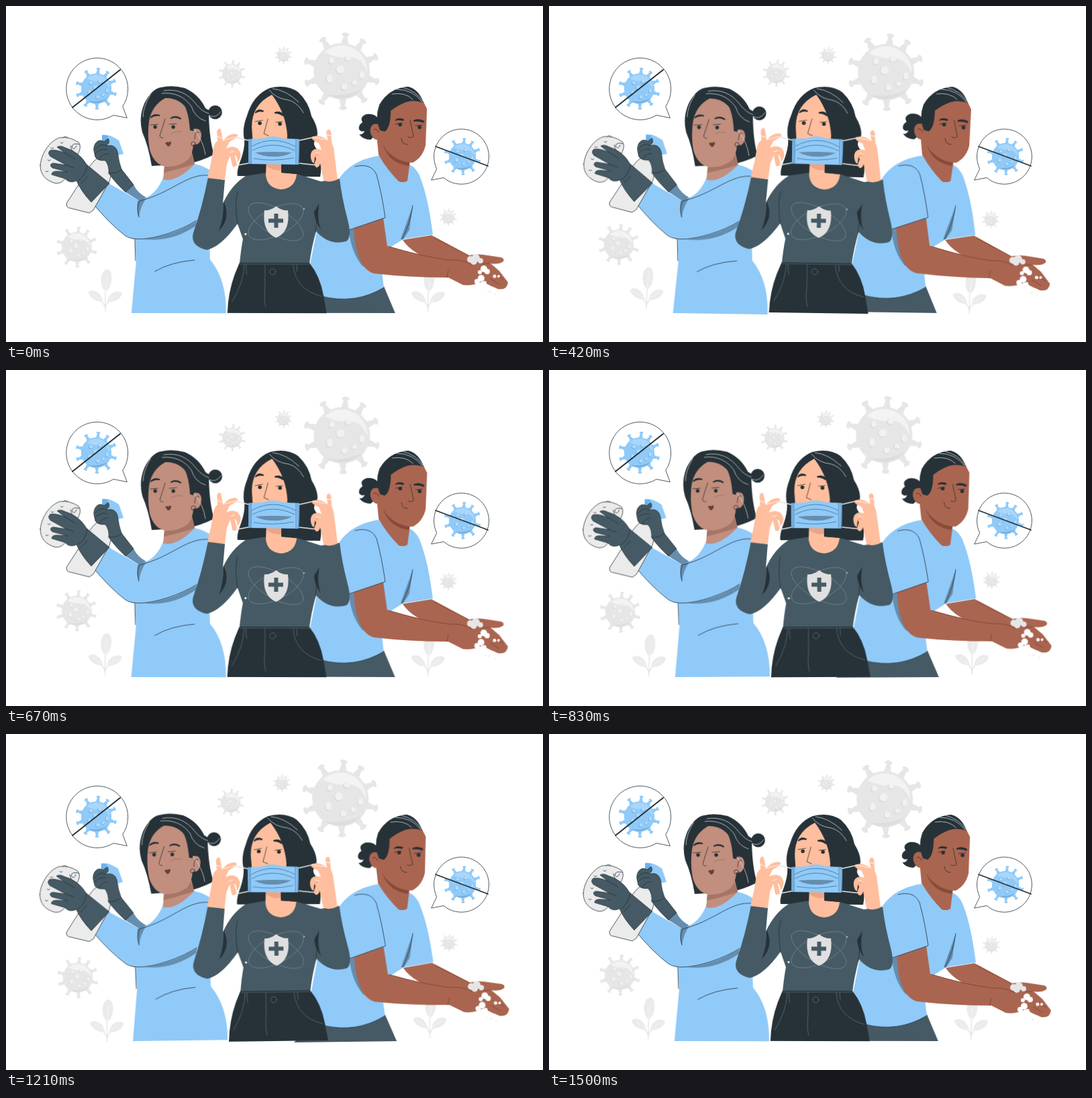
An HTML page for the animation above (1.54 s loop, 800 px wide and 500 px high).

```html
<!DOCTYPE html>
<html lang="en">
<head>
<meta charset="utf-8">
<title>Protection</title>
<style>
html, body { margin: 0; height: 100%; overflow: hidden; background: #fff; }
svg { display: block; width: 100vw; height: 100vh; }
.sway { animation: sway 1540ms linear infinite; }
@keyframes sway {
  0%, 97.4%, 100% { transform: rotate(.067deg); }
  22.7% { transform: rotate(1deg); }
  71.4% { transform: rotate(-1deg); }
}
.blue { fill: #90caf9; }
.shade { fill: #658dae; }
.slate { fill: #455a64; }
.dark { fill: #263238; }
.pale { fill: #ebebeb; }
.tan { fill: #c28e7d; }
.peach { fill: #ffbe9d; }
.brown { fill: #aa6550; }
.line, .edge { stroke: #263238; stroke-width: .8; stroke-linecap: round; stroke-linejoin: round; }
.line { fill: none; }
.thick { stroke-width: 1.2; }
.light { stroke: #dfe5e8; stroke-width: .7; }
.seam { stroke: #64747c; stroke-width: .7; }
.gray { --body: #e6e6e6; --glow: #f3f3f3; --bump: #f1f1f1; --dent: #dadada; }
.azure { --body: #90caf9; --glow: #a9d6fb; --bump: #b4dcfc; --dent: #6ea6d6; }
</style>
</head>
<body>
<svg viewBox="0 0 800 500">
<defs>
  <path id="spike" d="M-6-39 L-2.8-52 Q-6-53-5.5-56 Q0-60 5.5-56 Q6-53 2.8-52 L6-39Z"/>
  <g id="virus">
    <g fill="var(--body)">
      <use href="#spike" transform="rotate(6)"/>
      <use href="#spike" transform="rotate(35)"/>
      <use href="#spike" transform="rotate(67)"/>
      <use href="#spike" transform="rotate(106)"/>
      <use href="#spike" transform="rotate(142)"/>
      <use href="#spike" transform="rotate(178)"/>
      <use href="#spike" transform="rotate(213)"/>
      <use href="#spike" transform="rotate(251)"/>
      <use href="#spike" transform="rotate(286)"/>
      <use href="#spike" transform="rotate(329)"/>
      <circle r="42"/>
    </g>
    <path fill="var(--glow)" d="M-26-28 A38 38 0 0 1 38 2 Q32-18 14-21 Q-4-18-26-28Z"/>
    <path fill="var(--dent)" d="M-23 34 Q4 39 31 26 A42 42 0 0 1-23 34Z" opacity=".7"/>
    <g fill="var(--dent)">
      <circle cx="-3" cy="-2" r="6.5"/><ellipse cx="-19" cy="12" rx="5" ry="6.5"/>
      <circle cx="-16" cy="-15" r="5"/><circle cx="9" cy="-19" r="5"/>
      <circle cx="3" cy="24" r="5"/><ellipse cx="29" cy="6" rx="4.5" ry="6"/><circle cx="18" cy="18" r="4"/>
    </g>
    <g fill="var(--bump)">
      <circle cx="-2" cy="-3" r="6"/><ellipse cx="-18" cy="11" rx="4.5" ry="6"/>
      <circle cx="-15" cy="-16" r="4.4"/><circle cx="10" cy="-20" r="4.4"/>
      <circle cx="4" cy="23" r="4.4"/><ellipse cx="30" cy="5" rx="4" ry="5.5"/><circle cx="19" cy="17" r="3.5"/>
    </g>
  </g>
  <g id="plant">
    <path d="M148 455 Q148 430 149.500 400 M148 450 Q146 438 126 428 M148 450 Q150 438 170 430" fill="none" stroke="#e6e6e6" stroke-width="1.4"/>
    <path class="pale" d="M149 425 C138 418 140 393 151 392 C161 394 159 420 149 425Z M145 440 C136 442 124 434 123 426 C132 420 143 428 145 440Z M151 440 C153 428 164 422 173 427 C173 436 160 443 151 440Z"/>
    <path d="M149 424 L150.500 402 M144 439 L130 429 M152 439 L166 430" fill="none" stroke="#f8f8f8" stroke-width=".8"/>
  </g>
</defs>

<g class="sway gray" style="transform-origin:400px 248px">
  <use href="#virus" transform="translate(500 97)"/>
  <use href="#virus" transform="translate(336.500 101) scale(.35)"/>
  <use href="#virus" transform="translate(413 73) scale(.225)"/>
  <use href="#virus" transform="translate(105.500 359) scale(.53)"/>
  <use href="#virus" transform="translate(659 314) scale(.225)"/>
  <use href="#plant"/>
  <use href="#plant" x="481"/>
</g>

<g class="azure">
  <path class="edge" fill="#fff" d="M174 149 A46 46 0 1 0 160 162.500 L180 166.500Z"/>
  <use href="#virus" transform="translate(134.500 123) scale(.54)"/>
  <path class="line" d="M99 151 L170 95" style="stroke-width:2"/>
  <path class="edge" fill="#fff" d="M641.500 242 A41 41 0 1 1 652 255.500 L634 259Z"/>
  <use href="#virus" transform="translate(680 224) scale(.48)"/>
  <path class="line" d="M640 209 L718 238" style="stroke-width:1.800"/>
</g>

<!-- man washing hands -->
<g class="sway" style="transform-origin:588px 288px">
  <path class="slate" d="M427 457 L460 425 L563 417 L580 457Z"/>
  <path class="blue" d="M555 223 C530 227 510 237 497 256 L470 300 L450 400 L470 432 Q520 445 563 419 L559 385 L571 360 L592 347 L636 340 C632 310 627 280 616 252 Q610 240 601 236 L590 263Z"/>
  <path class="shade" d="M606 297 L588 347 L592 347 L601 333Z M511 333 Q514 368 532 388 L548 360 L530 329Z"/>
  <path class="line" d="M606 297 Q602 325 590 347 M470 432 Q520 445 563 419"/>
  <!-- far arm and hand -->
  <path class="brown" d="M591 348 L634 341 L690 371 Q704 368 718 371 L738 374 Q743 376 741 380 Q734 385 722 383 L735 394 L748 411 Q747 423 733 421 L690 400 L648 383 Q605 370 591 348Z"/>
  <!-- near arm -->
  <path class="brown" d="M518 330 L562 315 L568 357 Q620 372 658 378 Q680 376 694 384 L722 388 Q732 395 741 407 Q744 416 741 420 Q725 421 711 409 Q697 417 681 415 L659 404 Q600 404 548 398 Q521 390 518 330Z"/>
  <path class="line" d="M571 358 Q620 373 660 378 Q682 377 694 385 M659 393 L657 404 M720 383 Q708 384 700 381 M741 407 L731 400 M735 414 L722 406 M638 345 L689 371" style="stroke:#7b3f30"/>
  <path class="blue" d="M497 256 Q519 229 548 238 C557 262 562 290 565 315 L512 333Z"/>
  <path class="line" d="M520 239 Q544 233 552 251 Q560 280 565 315 L512 333"/>
  <!-- foam -->
  <g fill="#e6e6e6"><circle cx="692" cy="377" r="5"/><circle cx="700" cy="375" r="6"/><circle cx="697" cy="380" r="5"/><circle cx="707" cy="379" r="4"/></g>
  <g fill="#fff"><circle cx="712" cy="391" r="5"/><circle cx="706" cy="396" r="3"/><circle cx="717" cy="395" r="4"/><circle cx="708" cy="405" r="5"/><circle cx="702" cy="410" r="4"/><circle cx="713" cy="412" r="3"/><circle cx="728" cy="402" r="2.500"/><circle cx="734" cy="402" r="2"/></g>
  <g fill="#f0f0f0"><circle cx="721" cy="425" r="1.800"/><circle cx="729" cy="429" r="1.200"/><circle cx="715" cy="424" r="1"/></g>
  <!-- head -->
  <path class="dark" d="M556 169 Q549 159 537 161 Q526 165 531 173 Q524 178 526 184 Q529 188 534 186 Q532 192 526 191 Q532 199 543 199 Q552 192 556 182Z"/>
  <path class="brown" d="M552 192 L555 222 Q568 244 585 261 Q592 264 598 260 L602 230 L590 200Z"/>
  <path d="M562 208 Q571 234 600 238 L602 230Z" fill="#884b3a"/>
  <path class="brown" d="M557 177 C546 172 541 180 543 189 Q546 201 558 199 L566 214 Q583 233 606 233 Q621 225 625 207 L627 153 L620 139 L585 137 L566 160Z"/>
  <path class="dark" d="M557 185 Q549 166 556 147 Q570 122 599 120 Q615 124 622 144 Q608 139 596 143 Q583 148 573 156 Q573 181 564 187Z"/>
  <path class="line light" d="M582 124 Q606 124 620 143 M590 121 Q611 126 621 142 M575 131 Q595 128 606 139"/>
  <path class="line" d="M602 170 Q604 181 607 194 Q604 197 599 195 M580 176 L590 174 M610 178 L620 177 M548 184 Q552 181 555 188 M589 197 Q589 206 598 206"/>
  <path class="dark" d="M579 171 Q582 165 592 168 Q594 170 591 171 Q585 169 579 171Z M607 170 Q614 166 623 171 L622 174 Q615 171 607 172Z"/>
  <circle class="dark" cx="587" cy="176.500" r="2.800"/><circle class="dark" cx="616" cy="180.500" r="2.800"/>
</g>

<!-- woman with spray -->
<g class="sway" style="transform-origin:190px 288px">
  <path class="dark" d="M217 238 Q212 208 203 188 Q197 166 206 145 Q217 123 231 121 Q247 117 266 122 Q287 131 297 152 L302 155 L302 163 Q303 200 310 221 Q290 231 270 235Z"/>
  <circle class="dark" cx="311.500" cy="158" r="10.300"/>
  <!-- shirt -->
  <path class="blue" d="M236 250 L233 258 Q224 278 209 285 L199 290 L153 264 L127 291 Q154 324 178 342 L192 348 L194 381 L187 457 L328 457 Q329 407 304 377 L303 345 L320 300 L306 246 Q296 238 281 235Z"/>
  <path class="shade" d="M205 347 Q246 343 284 320 L283 327 Q246 352 205 347Z M196 290 L209 286 Q200 298 198 315 Q194 305 196 290Z M162 252 L172 243 L190 266 Q196 278 209 285 L199 290 L178 277Z"/>
  <path class="line" d="M303 252 C270 248 246 279 199 290 Q194 301 198 314 M127 291 Q154 324 178 342 Q195 353 240 339 Q267 330 284 319 M222 395 Q245 381 281 378 M192 348 L193 379"/>
  <!-- neck and face -->
  <path class="tan" d="M237 229 L234 258 Q254 263 281 235 L276 214Z"/>
  <path d="M236 238 Q261 240 276 220 L281 235 Q266 240 235 248Z" fill="#a67565"/>
  <path class="tan" d="M237 137 Q217 148 213 171 Q210 193 214 214 Q220 235 237 239 Q257 240 271 229 Q278 220 279 206 Q290 208 291 192 Q290 179 277 184 L271 155 Q258 136 237 137Z"/>
  <path class="dark" d="M237 137 Q252 131 264 145 Q272 157 274 185 L279 186 Q286 165 273 146 Q255 128 237 137Z"/>
  <path class="line light" d="M235 126 Q264 121 283 146 Q292 157 302 160 M232 130 Q260 127 276 149 Q281 166 297 171 M215 132 Q204 150 204 165 M280 183 Q294 201 297 221 M303 163 Q312 168 320 157"/>
  <path class="line" d="M237 168 Q233 180 229 193 Q230 197 234 196 M215 177 L226 176 M243 176 L254 175 M281 198 Q281 185 287 188"/>
  <path class="line" d="M246 190 L253 187 L262 187" style="stroke:#94675a;stroke-width:.6"/>
  <path class="dark" d="M215 165 Q220 159 229 162 L229 164 Q222 162 215 167Z M245 166 Q253 161 261 167 L260 169 Q253 164 245 168Z"/>
  <circle class="dark" cx="222" cy="180" r="2.700"/><circle class="dark" cx="249" cy="180" r="2.700"/>
  <path d="M237 204 Q240 201 242 203 Q245 200 246 203 Q245 209 241 209Z" fill="#683f37"/>
  <circle class="line" cx="279" cy="205" r="3.200"/>
  <!-- spray bottle -->
  <path class="pale edge" d="M148 218 Q126 231 119 249 L90 294 Q90 301 96 301 L124 308 L130 304 L154 261 L161 235Z"/>
  <path class="blue" d="M143 192 Q154 190 168 200 L175 220 L164 223 L154 207 L145 204Z"/>
  <path d="M143 192 L152 193 L148 202 L143 201Z" fill="#69b1ef"/>
  <path class="slate edge" d="M133 205 Q138 197 146 202 L152 197 Q156 204 149 208 Q163 205 166 217 Q168 233 172 243 L190 266 L178 277 Q162 262 153 249 Q154 238 148 230 Q132 231 132 220 Q129 211 133 205Z"/>
  <path class="line" d="M133 213 Q141 203 149 208 M132 220 Q141 211 150 214 M139 228 Q145 219 152 220 M153 249 Q165 250 172 243"/>
  <!-- cloth -->
  <path class="pale edge" d="M51 237 C53 217 67 200 80 196 Q95 194 108 203 Q114 210 105 224 Q96 239 91 253 Q84 265 74 264 Q51 258 51 237Z"/>
  <path class="line" d="M109 206 Q99 203 98 210 Q102 216 105 208 M96 208 Q98 219 104 221 M67 211 q2 3 4 0 M62 229 q2 3 4 0 M81 203 q2 3 4 0 M59 246 q2 2 4 0 M85 196 q3-3 7 0"/>
  <path class="slate edge" d="M66 215 Q74 213 88 219 L76 210 Q81 207 88 211 Q109 217 120 236 L154 264 L127 292 Q112 276 105 260 Q95 265 88 257 L68 251 Q68 246 76 246 L92 247 L69 241 Q63 236 70 234 L90 237 L66 224 Q61 218 66 215Z"/>
  <path class="line" d="M107 260 Q118 254 121 237 M112 264 L121 254 M88 219 L103 228 M90 237 L101 241"/>
</g>

<!-- woman with mask -->
<g class="sway" style="transform-origin:397px 289px">
  <path class="dark" d="M393 122 Q418 116 435 128 Q451 143 455 164 Q468 185 462 198 Q455 204 463 213 Q472 236 468 254 L345 253 Q343 246 350 228 Q356 211 355 199 Q351 183 359 163 Q368 132 393 122Z"/>
  <path class="slate" d="M301 255 L326 259 L323 294 Q336 266 357 253 L388 248 L434 250 L469 261 L497 257 Q500 284 509 318 Q516 344 507 350 Q481 357 462 335 Q455 360 452 384 L348 384 Q350 363 353 347 L345 324 Q320 359 299 363 Q274 357 279 338 Q292 301 301 255Z"/>
  <path class="dark" d="M324 291 Q336 315 317 335 Q325 315 324 291Z M466 295 Q463 318 469 332 Q460 321 459 306Z"/>
  <path class="line" d="M345 325 Q340 294 345 277 M461 337 Q463 315 466 295"/>
  <path class="peach" d="M388 225 L387 252 Q389 271 410 273 Q431 271 433 250 L410 248 L410 225Z"/>
  <path d="M388 235 L410 235 L410 244 Q398 246 388 238Z" fill="#eda485"/>
  <path class="dark" d="M410 236 L437 236 L468 253 L410 248Z"/>
  <path class="peach" d="M396 132 Q366 147 366 180 L368 210 Q381 233 400 235 Q418 220 419 193 Q417 160 396 132Z"/>
  <path class="line light" d="M392 125 Q402 138 421 140 Q435 144 443 159 M397 123 Q417 125 436 143"/>
  <path class="line" d="M390 168 Q387 180 384 190 L391 193 M371 172 L382 170 M402 173 L412 172"/>
  <path class="dark" d="M371 158 Q376 151 384 156 L383 158 Q377 156 371 160Z M400 158 Q409 155 414 162 L412 164 Q407 160 400 160Z"/>
  <circle class="dark" cx="378" cy="174.500" r="2.800"/><circle class="dark" cx="408" cy="175.500" r="2.800"/>
  <!-- mask -->
  <path class="line" d="M361 200 L336 194 M361 234 L340 238 M437 200 L464 194 M437 234 L464 237" style="stroke:#e6e6e6;stroke-width:1.300"/>
  <path class="blue" d="M361 198 L384 197 Q397 191 412 197 L437 198 L436 236 L361 235Z"/>
  <path class="shade" d="M371 218 Q397 216 426 218 Q413 225 397 224 Q382 224 371 218Z"/>
  <path class="line" d="M366 209 Q397 191 431 209 M367 215 Q397 199 430 215 M369 227 Q397 232 428 226 M365 198 L365 235 M432 198 L432 235" style="stroke:#45718f"/>
  <path d="M361 198 L364 198 L364 235 L361 235Z M434 198 L437 198 L436 236 L434 236Z" fill="#70aee0"/>
  <!-- hands -->
  <path class="peach" d="M300 256 Q306 233 309 211 Q311 203 315 201 L314 187 Q317 180 320 184 L323 200 L331 193 Q341 188 345 192 Q346 195 333 202 L328 212 Q338 207 345 212 Q351 218 349 226 L345 233 L343 222 L340 220 L344 235 Q341 242 337 238 L334 223 L329 235 L326 259Z"/>
  <path class="peach" d="M494 258 L488 211 L485 202 L484 187 Q481 180 477 187 L479 199 Q466 190 455 195 Q454 199 466 204 L470 214 Q460 210 455 217 Q452 224 456 232 L459 234 L460 224 L462 227 L459 236 Q463 244 467 237 L468 234 L473 259Q482 264 494 258Z"/>
  <path class="line" d="M309 192 L322 197 M323 200 L342 195 M333 218 L340 216 M478 192 L487 193 M457 195 L479 199 M462 218 L468 220" style="stroke:#fff"/>
  <path class="line" d="M340 220 L344 224 M460 224 L466 220" style="stroke:#d88968"/>
  <!-- emblem -->
  <g fill="none" stroke="#788992" stroke-width=".7">
    <ellipse cx="402" cy="321" rx="46" ry="19" transform="rotate(30 402 321)"/>
    <ellipse cx="402" cy="321" rx="45" ry="20" transform="rotate(-27 402 321)"/>
  </g>
  <path d="M402.500 298 Q411 305 420 304 Q424 336 402.500 345 Q381 336 385 304 Q394 305 402.500 298Z" fill="#e0e0e0"/>
  <path class="slate" d="M399.500 309 h6 v7.500 h7.500 v6 h-7.500 v7.500 h-6 v-7.500 h-8.500 v-6 h8.500Z"/>
  <circle cx="357" cy="339.500" r="1.500" fill="#fff"/><circle cx="444" cy="302" r=".9" fill="#e0e0e0"/>
  <!-- trousers -->
  <path class="dark" d="M348 382 L452 382 Q468 402 473 430 L478 457 L330 457 Q331 426 341 399Z"/>
  <path class="line seam" d="M349 384 L452 384 M355 385 Q354 413 337 440 M358 385 Q357 394 359 400 M386 385 L386 418 Q384 438 387 448 M428 385 Q431 422 470 432 M433 385 L434 395"/>
  <circle class="line seam" cx="397.500" cy="395.500" r="4.500"/>
</g>
</svg>
</body>
</html>
```
